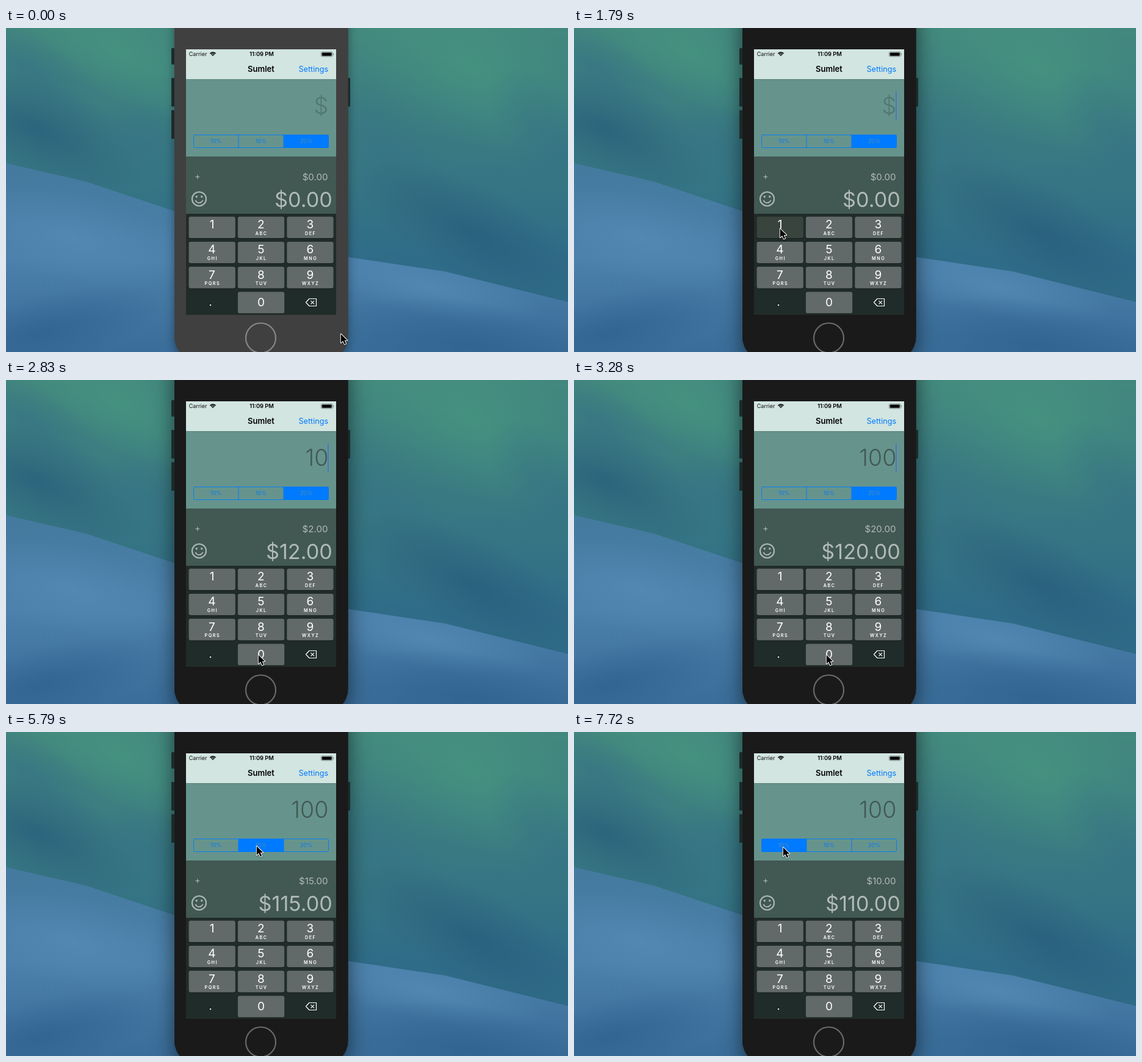
Write an HTML page with a canvas that moves like this. It is 921 by 532 pixels and loops after 8000 ms.

```html
<!DOCTYPE html>
<html lang="en">
<head>
<meta charset="utf-8">
<title>Tip calculator</title>
<style>
html, body { margin: 0; width: 100%; height: 100%; overflow: hidden; }
canvas { display: block; width: 921px; height: 532px; }
</style>
</head>
<body>
<canvas id="stage"></canvas>
<script>
const W = 921, H = 532, LOOP = 8000, TICK = 148.6;
const FONT = 'Inter, Roboto, sans-serif';
const BLUE = '#007aff', FIELD = '#66948c', PALE = '#b0bab7';
const dpr = window.devicePixelRatio || 1;

function makeCanvas(canvas) {
  canvas.width = W * dpr;
  canvas.height = H * dpr;
  const context = canvas.getContext('2d');
  context.scale(dpr, dpr);
  return context;
}

const stage = document.getElementById('stage');
const ctx = makeCanvas(stage);

function rect(x, y, w, h, color, radius = 0) {
  ctx.fillStyle = color;
  ctx.beginPath();
  ctx.roundRect(x, y, w, h, radius);
  ctx.fill();
}

function text(str, x, y, size, color, { align = 'left', weight = 400, spacing = 0 } = {}) {
  ctx.font = `${weight} ${size}px ${FONT}`;
  ctx.textAlign = align;
  ctx.letterSpacing = spacing + 'px';
  ctx.fillStyle = color;
  ctx.fillText(str, x, y);
}

function polygon(c, points) {
  c.beginPath();
  points.forEach(([x, y]) => c.lineTo(x, y));
  c.closePath();
}

function ring(x, y, r, width, color, from = 0, to = Math.PI * 2) {
  ctx.strokeStyle = color;
  ctx.lineWidth = width;
  ctx.beginPath();
  ctx.arc(x, y, r, from, to);
  ctx.stroke();
}

// Backdrop: soft sea tones, painted once.
const backdrop = document.createElement('canvas');

function glow(c, x, y, radius, rgb, squash, angle) {
  c.save();
  c.translate(x, y);
  c.rotate(angle);
  c.scale(1, squash);
  const g = c.createRadialGradient(0, 0, 0, 0, 0, radius);
  g.addColorStop(0, `rgba(${rgb},.8)`);
  g.addColorStop(.5, `rgba(${rgb},.4)`);
  g.addColorStop(1, `rgba(${rgb},0)`);
  c.fillStyle = g;
  c.fillRect(-radius, -radius, radius * 2, radius * 2);
  c.restore();
}

function paintBackdrop() {
  const c = makeCanvas(backdrop);
  const green = '70,148,128', teal = '54,116,132', deep = '40,94,124';
  const sky = '84,138,180', navy = '48,98,142';
  const sea = c.createLinearGradient(0, 0, 0, 380);
  sea.addColorStop(0, '#43887e');
  sea.addColorStop(.5, '#397a82');
  sea.addColorStop(1, '#2f6c88');
  c.fillStyle = sea;
  c.fillRect(0, 0, W, H);
  glow(c, 190, 40, 190, green, .4, .5);
  glow(c, 40, 70, 150, teal, .4, .55);
  glow(c, 50, 165, 200, deep, .4, .4);
  glow(c, 230, 190, 110, teal, .6, .3);
  glow(c, 760, 60, 240, green, .5, .5);
  glow(c, 900, 190, 150, teal, .5, .9);
  glow(c, 640, 230, 200, teal, .4, .9);
  glow(c, 770, 340, 220, deep, .35, .5);

  const water = c.createLinearGradient(0, 230, 0, H);
  water.addColorStop(0, '#457a9f');
  water.addColorStop(.5, '#4b80aa');
  water.addColorStop(1, '#3a6d99');
  polygon(c, [[0, 222], [130, 252], [280, 302], [560, 376], [720, 400], [W, 450], [W, H], [0, H]]);
  c.save();
  c.clip();
  c.fillStyle = water;
  c.fillRect(0, 0, W, H);
  glow(c, 110, 345, 210, sky, .35, .2);
  glow(c, 60, 500, 200, navy, .3, -.25);
  glow(c, 690, 425, 200, sky, .25, .2);
  glow(c, 760, 520, 240, navy, .3, .15);
  c.restore();
}

function drawPhone(focused) {
  const color = focused ? '#1a1a1a' : '#404040';
  const buttons = [[271, 33, 27], [271, 82, 47], [271, 135, 47], [559, 82, 47]];
  const body = () => rect(276, -60, 284.5, 607, color, 40);
  ctx.save();
  ctx.shadowColor = focused ? 'rgba(0,0,0,.55)' : 'rgba(0,0,0,.4)';
  ctx.shadowBlur = (focused ? 34 : 16) * dpr;
  ctx.shadowOffsetY = (focused ? 10 : 5) * dpr;
  body();
  ctx.restore();
  buttons.forEach(([x, y, h]) => rect(x, y, 5, h, '#1b2b2b', 1));
  body();
  ring(417.5, 509, 24.5, 2.2, focused ? '#666b69' : '#878787');
}

function drawHeader() {
  rect(295, 35, 246, 49, '#d2e5e0');
  rect(295, 84, 246, .7, '#55857d');
  text('Carrier', 299.7, 46.2, 9.1, '#111');
  text('11:09 PM', 419, 46.2, 9.3, '#000', { align: 'center', weight: 600 });
  for (const r of [1.6, 4, 6.4]) ring(339, 46.5, r, 1.6, '#000', Math.PI * 1.25, Math.PI * 1.75);
  ctx.strokeStyle = '#59615f';
  ctx.lineWidth = .7;
  ctx.beginPath();
  ctx.roundRect(516.5, 39.3, 18.5, 7.6, 1.8);
  ctx.stroke();
  rect(517.7, 40.5, 16, 5.2, '#000', .8);
  rect(535.8, 41.8, 1, 2.6, '#59615f', .5);
  text('Sumlet', 418, 72.1, 13, '#000', { align: 'center', weight: 600 });
  text('Settings', 528.3, 72.1, 12.7, BLUE, { align: 'right' });
}

function drawBill(bill, caret) {
  rect(295, 84.5, 246, 126.5, FIELD);
  text(bill || '$', 528.3, 141.3, 37.5, bill ? '#425853' : '#507770', { align: 'right', weight: 300 });
  ctx.globalAlpha = caret;
  rect(527.2, 104, 1.5, 47, '#3f6fd8');
  ctx.globalAlpha = 1;
}

function drawSegments(selected, pressed) {
  const width = 74, left = 307;
  ctx.save();
  ctx.beginPath();
  ctx.roundRect(left, 175, width * 3, 22, 2.6);
  ctx.clip();
  if (pressed >= 0) rect(left + pressed * width, 175, width, 22, 'rgba(0,122,255,.25)');
  rect(left + selected * width, 175, width, 22, BLUE);
  ctx.restore();
  ctx.strokeStyle = BLUE;
  ctx.lineWidth = .9;
  ctx.beginPath();
  ctx.roundRect(left + .5, 175.5, width * 3 - 1, 21, 2.4);
  ctx.stroke();
  [1, 2].forEach(i => rect(left + i * width - .5, 175, 1, 22, BLUE));
  ['10%', '15%', '20%'].forEach((label, i) =>
    text(label, 344 + i * width, 189.3, 9.3, i === selected ? '#4b8eb0' : '#0b79ee', { align: 'center' }));
}

function drawTotals(bill, rate) {
  const money = value => '$' + value.toFixed(2);
  const tip = bill * rate;
  rect(295, 211, 246, 94, '#425853');
  text('+', 314, 248.3, 14, PALE, { align: 'center' });
  text(money(tip), 527.5, 249.6, 15.1, PALE, { align: 'right' });
  text(money(Number(bill) + tip), 534.8, 294, 34.2, PALE, { align: 'right' });
  ring(316.5, 280.7, 11.5, 2.1, PALE);
  ring(316.5, 280.8, 6.3, 1.8, PALE, .3, Math.PI - .3);
  [312.3, 320.7].forEach(x => rect(x - 1.7, 275.2, 3.4, 3.4, PALE, 1.7));
}

function drawKeypad(pressed) {
  const letters = ['', 'ABC', 'DEF', 'GHI', 'JKL', 'MNO', 'PQRS', 'TUV', 'WXYZ'];
  const key = (digit, col, row, caption) => {
    const x = 299.5 + col * 80.4, y = 309.7 + row * 41.2;
    rect(x, y + 1, 76.3, 35.3, '#131b19', 3.2);
    rect(x, y, 76.3, 35.3, digit === pressed ? '#39443f' : '#626a69', 3.2);
    text(digit, x + 38, y + (digit === '0' ? 23.9 : 19.4), 19, '#fff', { align: 'center' });
    if (caption) text(caption, x + 38.8, y + 30.2, 7.2, '#fff', { align: 'center', weight: 600, spacing: 1.5 });
  };
  rect(295, 305, 246, 166, '#202c29');
  letters.forEach((caption, i) => key(String(i + 1), i % 3, Math.floor(i / 3), caption));
  key('0', 1, 3);
  rect(334, 454, 2.1, 2.1, '#fff', .5);

  ctx.strokeStyle = '#fff';
  ctx.lineWidth = 1.2;
  ctx.lineJoin = 'round';
  polygon(ctx, [[491.5, 450.5], [497, 444.5], [508.5, 444.5], [508.5, 456.5], [497, 456.5]]);
  ctx.stroke();
  ctx.beginPath();
  ctx.moveTo(499.5, 447.8);
  ctx.lineTo(505, 453.3);
  ctx.moveTo(505, 447.8);
  ctx.lineTo(499.5, 453.3);
  ctx.stroke();
}

function drawPointer([x, y]) {
  ctx.save();
  ctx.translate(x, y);
  polygon(ctx, [[.8, .5], [.8, 15], [4.2, 11.8], [6.8, 17.4], [9.2, 16.3], [6.7, 10.9], [11.2, 10.9]]);
  ctx.shadowColor = 'rgba(0,0,0,.4)';
  ctx.shadowBlur = 2 * dpr;
  ctx.shadowOffsetY = dpr;
  ctx.strokeStyle = '#fff';
  ctx.lineWidth = 2;
  ctx.stroke();
  ctx.shadowColor = 'transparent';
  ctx.fillStyle = '#000';
  ctx.fill();
  ctx.restore();
}

const pointerPath = [
  [4, 548, 502], [10, 337, 329], [14, 337, 329], [18, 413, 451], [24, 413, 451],
  [27.5, 398.5, 320], [31, 413, 195], [33, 411, 189], [35, 410, 187], [41, 410, 187], [46, 342, 189]
];
const caretSteps = [
  [0, 0], [1, .5], [2, 1], [5, .5], [6, 0], [8, .5], [9, 1], [25, .5], [26, 0], [28, .5], [29, 1],
  [32, .5], [33, 0], [34, .5], [35, 1], [38, .5], [39, 0], [42, .5], [43, 1], [45, .5], [46, 0],
  [48, .5], [49, 1], [52, 0]
];
const billSteps = [[0, ''], [13, '1'], [19, '10'], [21, '100']];
const keySteps = [[0, ''], [12, '1'], [13, ''], [18, '0'], [19, ''], [20, '0'], [22, '']];
const segmentSteps = [[0, 2], [38, 1], [49, 0]];
const pressSteps = [[0, -1], [37, 1], [38, -1], [48, 0], [49, -1]];

const valueAt = (steps, tick) => steps.findLast(([start]) => start <= tick)[1];

function pointerAt(tick) {
  const next = pointerPath.findIndex(([at]) => at > tick);
  if (next === 0) return pointerPath[0].slice(1);
  if (next < 0) return pointerPath.at(-1).slice(1);
  const [t0, x0, y0] = pointerPath[next - 1], [t1, x1, y1] = pointerPath[next];
  const p = (tick - t0) / (t1 - t0), ease = p * p * (3 - 2 * p);
  return [x0 + (x1 - x0) * ease, y0 + (y1 - y0) * ease];
}

function render(ms) {
  const tick = Math.floor((ms + 8) / TICK);
  const bill = valueAt(billSteps, tick);
  const segment = valueAt(segmentSteps, tick);
  ctx.drawImage(backdrop, 0, 0, W, H);
  drawPhone(tick >= 12);
  drawHeader();
  drawBill(bill, valueAt(caretSteps, tick));
  drawSegments(segment, valueAt(pressSteps, tick));
  drawTotals(bill, [.1, .15, .2][segment]);
  drawKeypad(valueAt(keySteps, tick));
  drawPointer(pointerAt(tick));
}

const start = performance.now();
function loop() {
  render((performance.now() - start) % LOOP);
  requestAnimationFrame(loop);
}
paintBackdrop();
loop();
</script>
</body>
</html>
```
